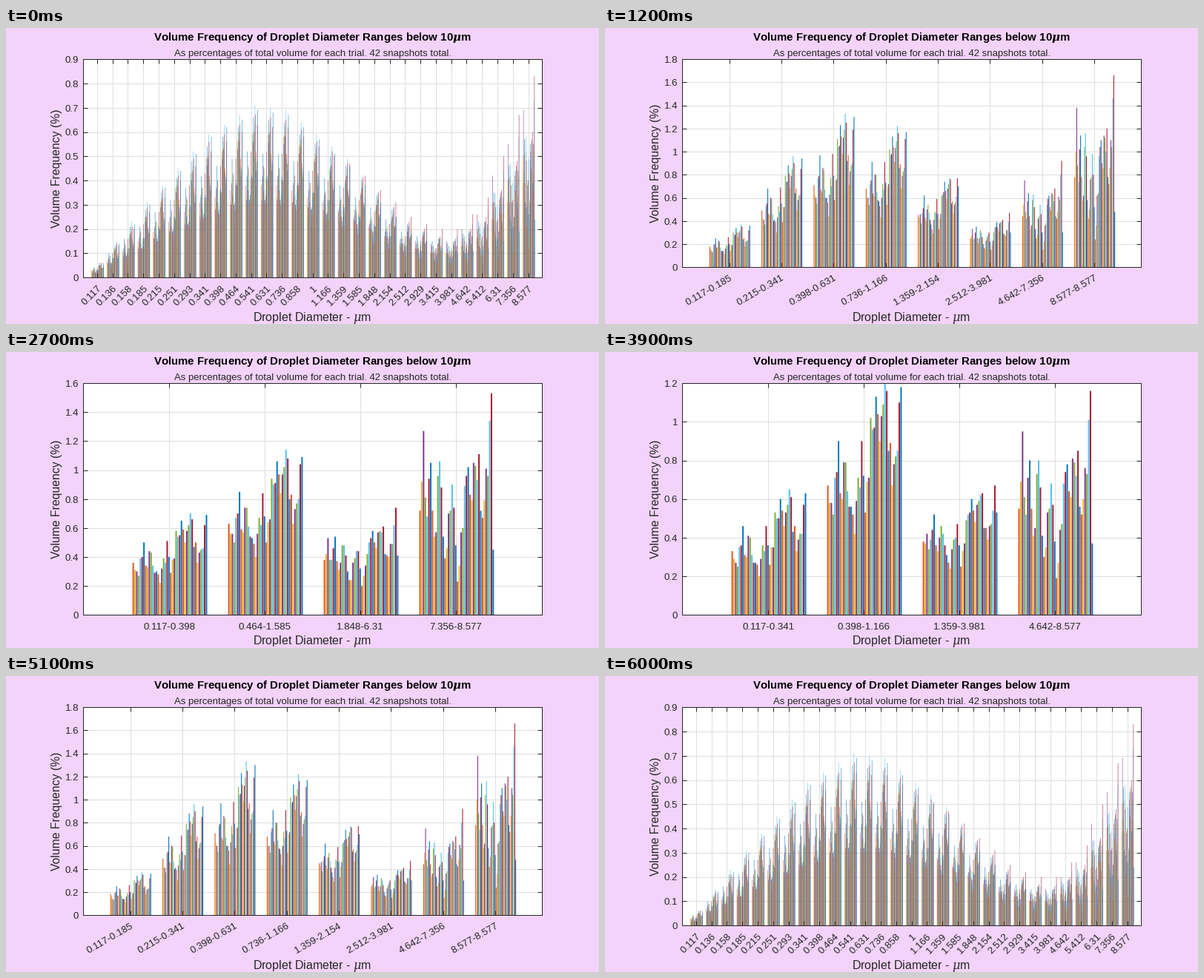
Animation, 800 px wide and 400 px high, one loop 6600 ms. Source, as a matplotlib script:

```python
import matplotlib.pyplot as plt
import numpy as np
from matplotlib.animation import FuncAnimation
from matplotlib.collections import LineCollection, PolyCollection
from matplotlib.patches import Rectangle

W, H, DPI = 800, 400, 100
LEFT, RIGHT, TOP = 104.2, 723.2, 42.2
FRAMES, INTERVAL = 22, 300
BINS, TRIALS = 29, 42
INK = "#262626"
BACK = "#f3d3fa"
COLORS = ["#d95319", "#edb120", "#7e2f8e", "#77ac30", "#4dbeee", "#a2142f", "#0072bd"]
Y_MAX = [0.9, 1.8, 1.6, 1.8, 1.4, 1.4, 1.8, 1.2, 1.6]

# Turning points: (bin, mean volume) and (trial, relative volume)
MEANS = [(0, 0.036), (3, 0.18), (7, 0.36), (10, 0.445), (12, 0.44), (16, 0.32),
         (20, 0.155), (22, 0.115), (23, 0.11), (25, 0.17), (28, 0.417)]
MEDIUM = [(0, 0.87), (2, 0.73), (6, 1.16), (8, 0.79), (9, 1.03), (15, 0.55), (19, 1.17),
          (21, 0.71), (24, 1.32), (28, 1.34), (33, 1.48), (36, 0.87), (41, 1.53)]
LARGE = [(0, 0.94), (2, 1.65), (4, 0.89), (6, 1.37), (8, 0.7), (11, 1.39), (14, 0.5),
         (18, 1.18), (21, 0.29), (25, 1.15), (33, 1.44), (35, 0.86), (40, 1.99), (41, 0.58)]

plt.rcParams["font.family"] = "Liberation Sans"
plt.rcParams["mathtext.fontset"] = "dejavuserif"

NAMES = [f"{round(10 ** ((k - 14) / 15), 3):g}" for k in range(BINS)]


def curve(points, count):
    return np.interp(np.arange(count), *zip(*points))


def rough(points, rng):
    """Trial profile that scatters between its turning points."""
    noise = rng.uniform(0.78, 1.1, TRIALS)
    noise[[t for t, _ in points]] = 1
    return curve(points, TRIALS) * noise


def build_data():
    rng = np.random.default_rng(4)
    medium = rough(MEDIUM, rng)[:, None]
    large = rough(LARGE, rng)[:, None]
    bins = np.arange(BINS)
    blend = np.clip((bins - 11) / 15, 0, 1) ** 2
    power = np.maximum(1, 1.25 - bins / 48)
    profile = (1 - blend) * medium ** power + blend * large
    return np.round(profile * curve(MEANS, BINS), 2)


DATA = build_data()


def smooth(row, n):
    kernel = np.ones(n) / n
    if n % 2 == 0:
        kernel = np.convolve(kernel, [0.5, 0.5])
    padded = np.pad(row, len(kernel) // 2, mode="reflect", reflect_type="odd")
    return np.convolve(padded, kernel, mode="valid")


def grouped(n):
    """Bar heights (groups x trials) and labels for n bins per group."""
    if n == 1:
        return DATA.T, NAMES
    rows = np.array([smooth(row, n) for row in DATA])
    starts = range(0, BINS, n)
    heights = [2 * rows[:, s:s + n].mean(axis=1) for s in starts]
    labels = [f"{NAMES[s]}-{NAMES[min(s + n, BINS) - 1]}" for s in starts]
    return np.round(np.maximum(heights, 0), 2), labels


def layout(n):
    """Axis bottom, label angle, label height and caption baseline."""
    if n == 1:
        return 337.2, 45, 346, 396
    if n <= 4:
        return 323.2, 30, 332, 396
    return 355.2, 0, 375, 395


fig = plt.figure(figsize=(W / DPI, H / DPI), dpi=DPI, facecolor=BACK)
ax = fig.add_axes([0, 0, 1, 1])


def text(x, y, s, px, color=INK, ha="center", va="baseline", **kw):
    ax.text(x, y, s, fontsize=px * 72 / DPI, color=color, ha=ha, va=va, **kw)


def lines(segments, color, z):
    ax.add_collection(LineCollection(segments, colors=color, linewidths=0.72, zorder=z))


def box(bottom, **kw):
    ax.add_patch(Rectangle((LEFT, TOP), RIGHT - LEFT, bottom - TOP, **kw))


def draw_bars(xs, heights, step, bottom, scale):
    slot = step * 0.785 / TRIALS
    half = max(slot * 0.4, 0.25)
    bars = []
    for x, group in zip(xs, heights):
        for t, value in enumerate(group):
            c = x + 0.8 + (t - (TRIALS - 1) / 2) * slot
            y = max(bottom - value * scale, TOP)
            bars.append([(c - half, bottom), (c - half, y), (c + half, y), (c + half, bottom)])
    colors = [COLORS[t % len(COLORS)] for t in range(TRIALS)] * len(xs)
    poly = PolyCollection(bars, facecolors=colors, linewidths=0, zorder=2)
    poly.set_snap(False)
    ax.add_collection(poly)


def draw(i):
    n = int(np.clip(min(i, FRAMES - 1 - i), 1, 9))
    heights, labels = grouped(n)
    bottom, angle, label_y, caption_y = layout(n)
    top_value = Y_MAX[n - 1]
    step = (RIGHT - LEFT) / (len(labels) + 0.8)
    xs = LEFT + step * (0.9 + np.arange(len(labels)))
    marks = np.arange(0, top_value + 0.01, 0.1 if n == 1 else 0.2)
    scale = (bottom - TOP) / top_value
    ys = bottom - marks * scale

    ax.cla()
    ax.set(xlim=(0, W), ylim=(H, 0))
    ax.axis("off")
    box(bottom, fc="white", lw=0, zorder=0)
    lines([[(x, TOP), (x, bottom)] for x in xs] + [[(LEFT, y), (RIGHT, y)] for y in ys],
          "#dedede", 1)
    draw_bars(xs, heights, step, bottom, scale)

    ticks = [[(x, y), (x, y + d)] for x in xs for y, d in ((bottom, -6), (TOP, 6))]
    ticks += [[(x, y), (x + d, y)] for y in ys for x, d in ((LEFT, 6), (RIGHT, -6))]
    lines(ticks, INK, 3)
    box(bottom, fill=False, ec=INK, lw=0.72, zorder=4)

    for value, y in zip(marks, ys):
        text(98, y + 4.8, f"{value:.3g}", 13.2, ha="right")
    slant = dict(ha="right", va="top", rotation=angle, rotation_mode="anchor") if angle else {}
    for x, label in zip(xs, labels):
        text(x, label_y, label, 13.3, **slant)

    mid = (LEFT + RIGHT) / 2
    text(mid, 17, r"Volume Frequency of Droplet Diameter Ranges below 10$\boldsymbol{\mu}$m",
         15, "black", weight="bold")
    text(mid + 0.5, 38,
         "As percentages of total volume for each trial. 42 snapshots total.", 13.14)
    text(mid - 0.6, caption_y, r"Droplet Diameter - $\mu$m", 16)
    text(73, (TOP + bottom) / 2, "Volume Frequency (%)", 15.7,
         rotation=90, rotation_mode="anchor")
    return []


anim = FuncAnimation(fig, draw, frames=FRAMES, init_func=lambda: draw(0),
                     interval=INTERVAL, repeat=True, repeat_delay=0, blit=False)
plt.show()
```
